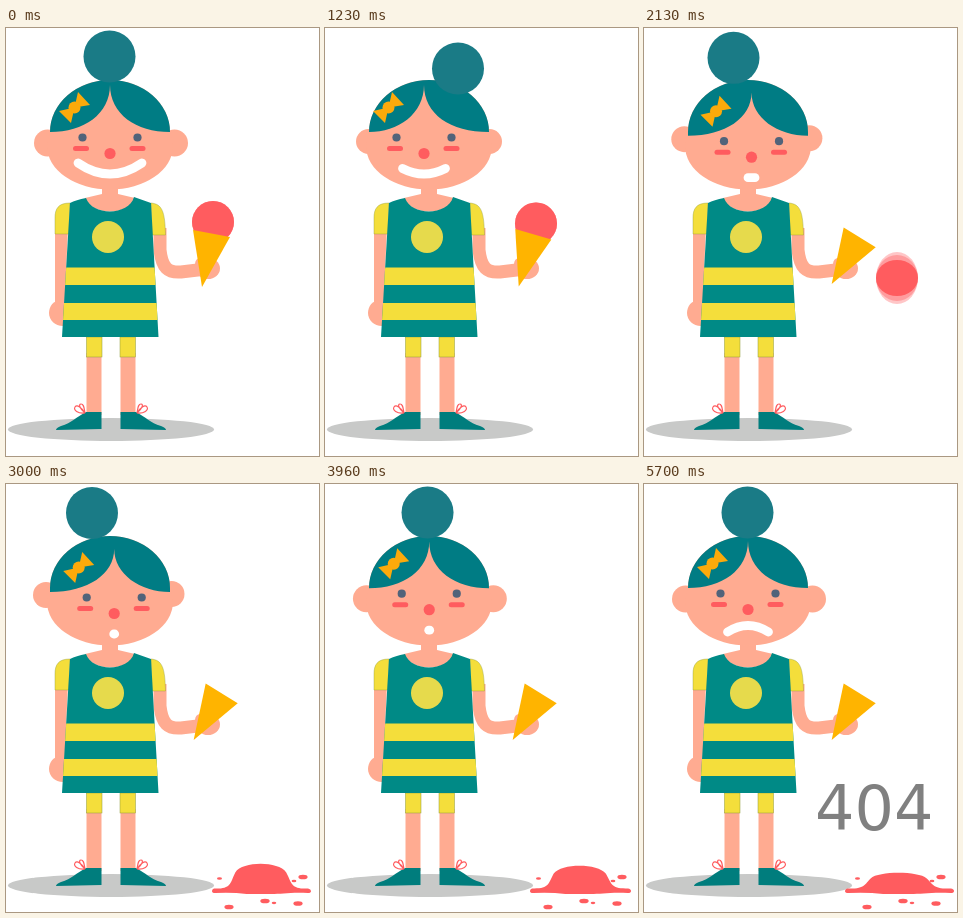
An HTML page that plays this animation: 313 by 428 pixels, repeating every 5730 ms.

```html
<!DOCTYPE html>
<html lang="en">
<head>
<meta charset="utf-8">
<title>404</title>
<style>
  html, body { margin: 0; width: 100%; height: 100%; overflow: hidden; background: #fff; }
  svg { display: block; width: 100vw; height: 100vh; }
  .skin { fill: #ffab91; }
  .teal { fill: #008a86; }
  .hair { fill: #007c84; }
  .yellow { fill: #f4de3b; }
  .red { fill: #ff5c5f; }
  .eye { fill: #51637a; }
  .bow { fill: #fcaa0b; }
  .lace { fill: none; stroke: #ff5c5f; stroke-width: 1.2; }
  text { font: 62px "DejaVu Sans", Verdana, sans-serif; fill: #808080; }
</style>
</head>
<body>
<svg viewBox="0 0 313 428">
  <defs>
    <path id="dress" d="M64 175Q70 172 80 170C86 188 123 188 128 169L145 175L152.500 309H56Z"/>
    <clipPath id="dressClip"><use href="#dress"/></clipPath>
    <g id="leg">
      <rect class="skin" x="80.500" y="325" width="15" height="62"/>
      <rect class="yellow" x="80.500" y="309" width="15.500" height="20" stroke="#8f9a3c" stroke-width=".5"/>
      <path d="M50 402Q50 400 55 398C66 395 70 389 80 384H95.500V401Z" fill="#007d7d"/>
      <path class="lace" d="M79 385C72 386 67 382 69 379S76 380 79 385C74 381 72 376 75 376S78 380 79 385"/>
    </g>
  </defs>

  <ellipse cx="105" cy="401.500" rx="103" ry="11.500" fill="#c8c9c8"/>
  <use href="#leg"/>
  <use href="#leg" transform="translate(210 0) scale(-1 1)"/>

  <path class="skin" d="M49 200H62L58 288H49Z"/>
  <path class="skin" d="M57 272C48 271 43 278 43 285S49 298 57 298Z"/>
  <path d="M154 200V222C156 240 162 245 175 244L200 241" fill="none" stroke="#ffab91" stroke-width="13"/>
  <ellipse class="skin" cx="202" cy="240.500" rx="12" ry="10.500"/>
  <ellipse class="skin" cx="194" cy="236" rx="5" ry="6"/>
  <path class="yellow" d="M64 175C52 175 49 181 49 190V206H63ZM145 175C156 176 159 183 159.500 207H146Z" stroke="#8f9a3c" stroke-width=".4"/>
  <path class="skin" d="M96 155H112V166L129 170C123 188 86 188 79 170L96 166Z"/>
  <use href="#dress" class="teal"/>
  <path class="yellow" clip-path="url(#dressClip)" d="M50 239.500H160V257H50ZM50 275H160V292H50Z"/>
  <circle cx="102" cy="209" r="16" fill="#e6da4c"/>

  <circle id="earL" class="skin"/>
  <circle id="earR" class="skin"/>
  <ellipse class="skin" cx="104" cy="118" rx="63" ry="43.500"/>
  <path class="skin" d="M44 110V104A60 52 0 0 1 164 104V110Z"/>
  <path id="hair" class="hair"/>
  <circle id="bun" r="26" fill="#1a7b86"/>
  <g id="face">
    <path class="bow" d="M72 64L84 77L68.500 79.500ZM53 83L65 95L68.500 79.500Z"/>
    <circle class="bow" cx="68.500" cy="79.500" r="6"/>
    <circle class="eye" cx="76.500" cy="109.500" r="4.100"/>
    <circle class="eye" cx="131.500" cy="109.500" r="4.100"/>
    <rect class="red" x="67" y="118" width="16" height="5" rx="2.500"/>
    <rect class="red" x="123.500" y="118" width="16" height="5" rx="2.500"/>
    <circle class="red" cx="104" cy="125.500" r="5.600"/>
    <path id="mouth" fill="none" stroke="#fff" stroke-width="8.800" stroke-linecap="round"/>
  </g>

  <g id="ball" class="red">
    <ellipse rx="21" opacity=".35"/>
    <ellipse rx="21" opacity=".4"/>
    <ellipse rx="21"/>
  </g>
  <path id="cone" d="M187 202L224 209L196 259Z" fill="#ffb400"/>
  <path id="puddle" class="red"/>
  <g id="drops" class="red"></g>
  <text id="label" x="171" y="346">404</text>
</svg>
<script>
const LOOP = 5730, STEP = 30;
const el = id => document.getElementById(id);
const set = (node, attrs) => { for (const k in attrs) node.setAttribute(k, attrs[k]); };

const linear = p => p;
const inOut = p => p < .5 ? 4 * p ** 3 : 1 - 4 * (1 - p) ** 3;
const progress = (t, from, to) => Math.min(1, Math.max(0, (t - from) / (to - from)));
const mix = (a, b, p) => a + (b - a) * p;

// Each key is [time, ...values]; values hold before the first and after the last.
function track(t, keys, ease = linear) {
  const i = keys.findIndex(k => k[0] > t);
  if (i === 0) return keys[0].slice(1);
  if (i < 0) return keys[keys.length - 1].slice(1);
  const a = keys[i - 1], b = keys[i], p = ease(progress(t, a[0], b[0]));
  return a.slice(1).map((v, n) => mix(v, b[n + 1], p));
}

// Head poses: face x, face y, bun x, bun y, left ear x y r, right ear x y r
const FRONT = [0, 0, 103.5, 28.5, 41.5, 115, 13.5, 168.5, 115, 13.5];
const LEFT = [-5, 0, 133, 40.5, 43.5, 113.5, 12.5, 164.5, 113.5, 12.5];
const RIGHT = [4.2, 4, 86, 29, 40, 111, 13, 165.5, 110, 13];
const HEAD = [[630, ...FRONT], [1230, ...LEFT], [1465, ...LEFT], [2370, ...RIGHT],
              [3200, ...RIGHT], [4200, ...FRONT]];

// Half width, sag, middle height
const MOUTH = [[630, 32, 11, 146], [1230, 21.5, 5.5, 146], [2130, 3.5, 0, 146], [2370, .5, 0, 146]];
const FROWN = [[4800, .5, 0, 146], [5500, 20.5, -6.5, 141.5]];

const SLIDE = [[1230, 211, 195.5], [1800, 229, 198], [1890, 239, 200], [2130, 253, 200], [2350, 255, 200]];
const FALL_START = 1890, LAND = 2350;

// Half width, top
const MELT = [[2340, 24, 374], [2460, 49, 378], [3000, 49.5, 378], [3960, 50.5, 380],
              [4710, 52.5, 384], [5700, 54.5, 388]];

const DROPS = [[213.5, 394.5, 2.5], [297, 393, 4.6], [288, 397, 2.4], [223, 423, 4.6],
               [259, 417, 4.7], [268, 419, 2.3], [292, 419.5, 4.6]];
const dropNodes = DROPS.map(([, , r]) => {
  const node = document.createElementNS("http://www.w3.org/2000/svg", "ellipse");
  set(node, { rx: r, ry: r / 2 });
  return el("drops").appendChild(node);
});

function drawHead(t) {
  const [x, y, bunX, bunY, lx, ly, lr, rx, ry, rr] = track(t, HEAD, inOut);
  const part = 104 + x, tip = 57 + 2 * y, end = 104 + y;
  set(el("earL"), { cx: lx, cy: ly, r: lr });
  set(el("earR"), { cx: rx, cy: ry, r: rr });
  set(el("bun"), { cx: bunX, cy: bunY });
  set(el("face"), { transform: `translate(${x} ${y})` });
  set(el("hair"), { d: `M44 ${end}V104A60 52 0 0 1 164 104V${end}
    C${part + 26} ${end} ${part} ${end - 18} ${part} ${tip}
    C${part} ${end - 18} ${part - 26} ${end} 44 ${end}Z` });

  const [w, sag, mid] = t < 4800 ? track(t, MOUTH) : track(t, FROWN, inOut);
  const ends = mid - sag;
  set(el("mouth"), { d: `M${104 - w} ${ends}Q104 ${mid + sag} ${104 + w} ${ends}` });
}

function drawIceCream(t) {
  const tilt = 21 * progress(t, 630, 1800) ** 2;
  set(el("cone"), { transform: `rotate(${tilt} 200 235)` });

  let x, y;
  if (t < 1230) {
    const p = progress(t, 630, 1230) ** 2;
    [x, y] = [mix(207, 211, p), mix(194, 195.5, p)];
  } else {
    [x, y] = track(t, SLIDE);
  }
  const fall = Math.max(0, t - FALL_START);
  y += 50 * (fall / 240) ** 2;
  const blur = fall / 48;
  const [outer, middle, core] = el("ball").children;
  set(outer, { ry: 21 + blur });
  set(middle, { ry: 21 + blur * .4 });
  set(core, { ry: 21 - blur * .6 });
  set(el("ball"), { transform: `translate(${x} ${y})`, visibility: t < LAND ? "visible" : "hidden" });
}

function drawPuddle(t) {
  const visibility = t < LAND ? "hidden" : "visible";
  const [w, top] = track(t, MELT);
  const X = u => 255.5 + u * w;
  set(el("puddle"), { visibility, d: `M${X(-.96)} 404.500
    C${X(-.62)} 405 ${X(-.64)} 400 ${X(-.53)} ${mix(top, 404, .4)}
    C${X(-.38)} ${top - 1} ${X(.34)} ${top - 1} ${X(.5)} ${mix(top, 404, .4)}
    C${X(.62)} 400 ${X(.6)} 405 ${X(.94)} 404.500
    Q${X(1)} 405 ${X(1)} 407T${X(.94)} 409
    C${X(.6)} 408 ${X(.4)} 410 0 410
    `.replace(" 0 410", ` ${X(.2)} 410`) + `H${X(-.3)}Q${X(-.6)} 408 ${X(-.94)} 409
    Q${X(-1)} 409 ${X(-1)} 407T${X(-.96)} 404.500Z` });

  const p = progress(t, LAND, 2470);
  set(el("drops"), { visibility });
  DROPS.forEach(([x, y], i) => set(dropNodes[i], {
    cx: mix(255, x, p),
    cy: mix(400, y, p) - 24 * p * (1 - p)
  }));
}

function draw(t) {
  drawHead(t);
  drawIceCream(t);
  drawPuddle(t);
  set(el("label"), { opacity: progress(t, 4830, 5430) });
}

const start = performance.now();
function tick() {
  const t = (performance.now() - start) % LOOP;
  draw(Math.floor(t / STEP) * STEP);
  requestAnimationFrame(tick);
}
tick();
</script>
</body>
</html>
```
